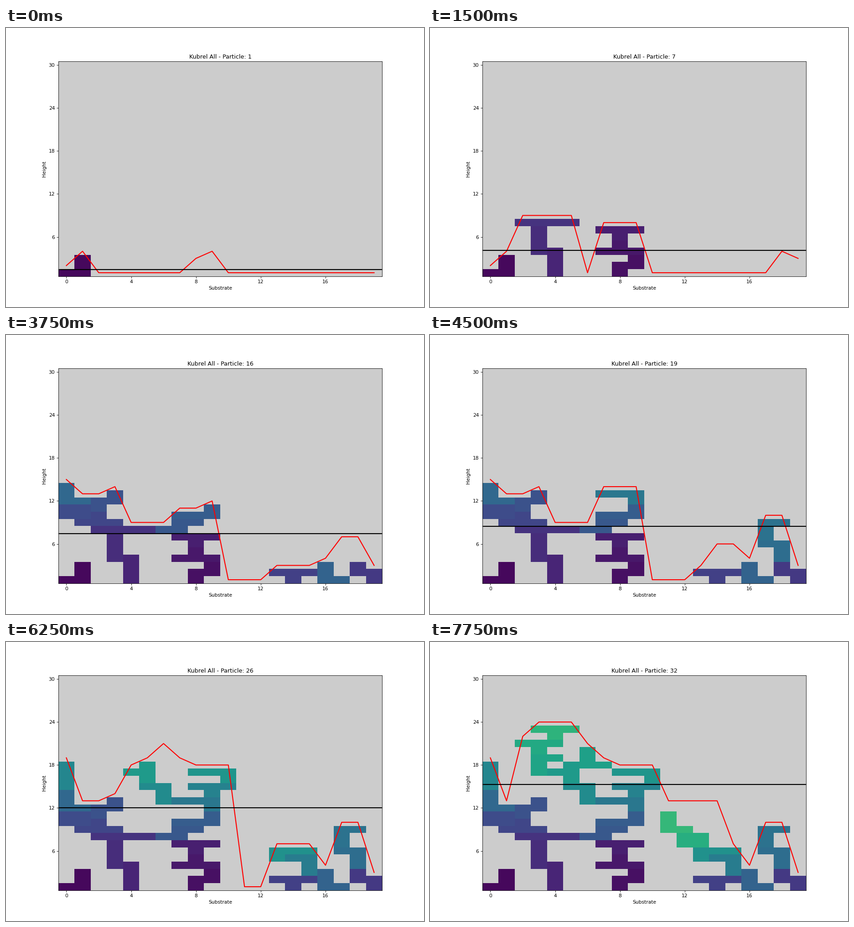
Recreate the animation shown at these times as a matplotlib script. Size 917 by 611 pixels, loop 8000 ms.

```python
import numpy as np
import matplotlib.pyplot as plt
from matplotlib.animation import FuncAnimation

WIDTH, HEIGHT = 20, 30
STEPS = 32
COLOR_MAX = 48
DPI = 76.4

# Each shape lists its columns from left to right as "bottom offset, cell count".
SHAPES = {
    "I": "04",
    "H": "01 01 01 01",
    "O": "02 02",
    "J": "01 03",
    "L": "03 01",
    "G": "03 21",
    "Q": "21 03",
    "S": "02 12",
    "Z": "12 02",
    "W": "01 02 11",
    "U": "01 02 01",
    "T": "11 02 11",
    "K": "11 03",
    "E": "01 01 02",
    "R": "11 11 02",
    "F": "02 11 11",
}

# Shape and left column of every piece; "*" marks one that sticks to its sides.
PIECES = """
    J0 S8 U7 T7 I4 I3* H2 Z18 T13 U1 O0
    S2 W6 E7 L16 L0 Q17 G17 R7 Q14 T8 I0
    Q5* F13 R8 K4 L6* G3* T2 O12 T3 L11 H11
""".split()


def cells_of(shape, left):
    columns = enumerate(SHAPES[shape].split(), left)
    return [(x, int(c[0]) + i) for x, c in columns for i in range(int(c[1]))]


def drop(grid, cells, sticky):
    """Lower the cells until they rest or stick, and return their places."""
    def filled(x, y):
        return 0 <= x < WIDTH and grid[y, x] >= 0

    y = HEIGHT + 1
    while True:
        placed = [(x, y + dy) for x, dy in cells]
        if any(filled(x, r - 1) for x, r in placed):
            return placed
        if sticky and any(filled(x - 1, r) or filled(x + 1, r)
                          for x, r in placed):
            return placed
        y -= 1


def build_states():
    grid = np.full((HEIGHT + 8, WIDTH), -1.0)
    grid[0] = 0
    heights = np.ones(WIDTH)
    layers, surfaces = [], []
    for number, code in enumerate(PIECES, 1):
        sticky = code.endswith("*")
        cells = cells_of(code[0], int(code[1:].rstrip("*")))
        for x, y in drop(grid, cells, sticky):
            grid[y, x] = number
            heights[x] = max(heights[x], y + 1)
        visible = grid[1:HEIGHT + 1]
        layers.append(np.ma.masked_less(visible.copy(), 0))
        surfaces.append(heights.copy())
    return layers, surfaces


layers, surfaces = build_states()

# The small surplus keeps the pixel size from rounding down.
fig, ax = plt.subplots(figsize=(917.001 / DPI, 611.001 / DPI), dpi=DPI)
ax.set_facecolor("0.8")
mesh = ax.pcolormesh(np.arange(WIDTH + 1) - 0.5, np.arange(HEIGHT + 1) + 0.5,
                     layers[0], cmap="viridis", vmin=0, vmax=COLOR_MAX)
surface, = ax.plot(np.arange(WIDTH), surfaces[0], color="red", lw=2)
mean_line = ax.axhline(1, color="black", lw=2)
ax.set_xlim(-0.5, WIDTH - 0.5)
ax.set_ylim(0.5, HEIGHT + 0.5)
ax.set_xticks(range(0, WIDTH, 4))
ax.set_yticks(range(6, HEIGHT + 1, 6))
ax.set_xlabel("Substrate")
ax.set_ylabel("Height")
title = ax.set_title("")


def update(step):
    # The surface already counts the piece that lands next.
    heights = surfaces[step + 1]
    mesh.set_array(layers[step])
    surface.set_ydata(heights)
    mean_line.set_ydata([heights.mean()] * 2)
    title.set_text(f"Kubrel All - Particle: {step + 1}")
    return mesh, surface, mean_line, title


anim = FuncAnimation(fig, update, frames=STEPS, interval=250,
                     init_func=lambda: update(0), repeat=True)
plt.show()
```
